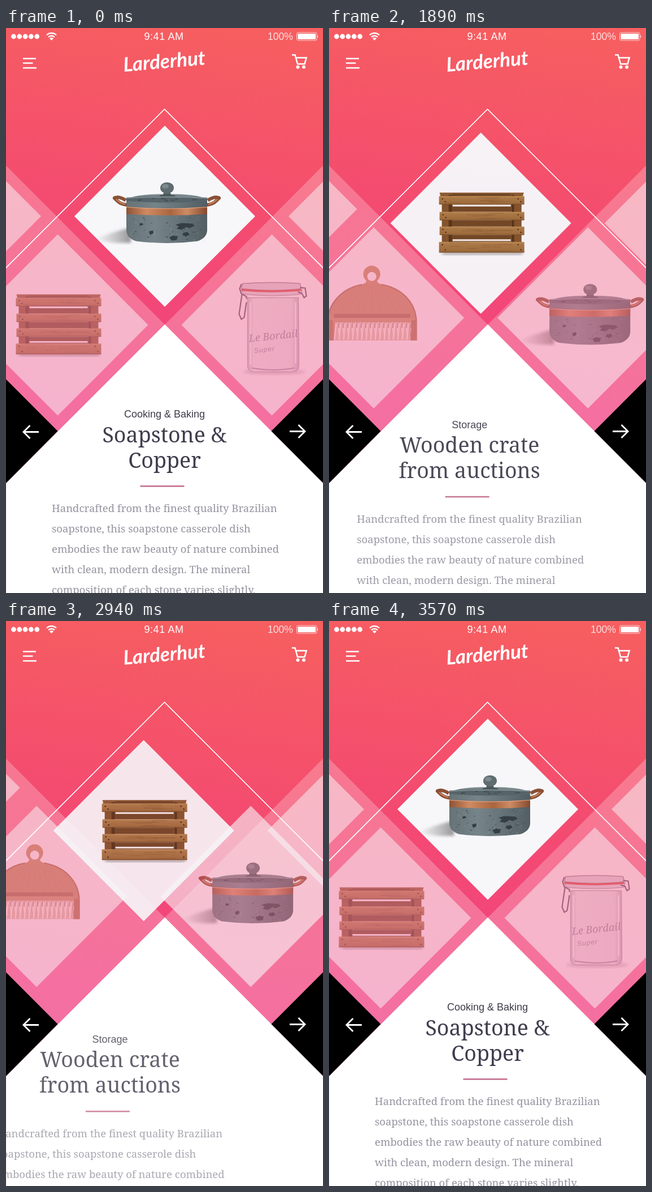
These frames come from a looping animation (561x998 px, 4970 ms). An HTML page:

```html
<!DOCTYPE html>
<html lang="en">
<head>
<meta charset="utf-8">
<title>Shop carousel</title>
<style>
  html, body { margin: 0; width: 100%; height: 100%; overflow: hidden; background: #fff; }
  svg { display: block; width: 100%; height: 100%; }
  .sans { font-family: "Liberation Sans", Arial, sans-serif; }
  .serif { font-family: "Noto Serif", serif; }
  .category { font-size: 18px; fill: #3d3b48; text-anchor: middle; }
  .title { font-size: 37.6px; fill: #3f3d4d; text-anchor: middle; }
  .copy { font-size: 18.55px; font-weight: 300; fill: #96939f; }
  .line { fill: none; stroke: #fff; stroke-width: 2.6; }
  .brand { font: italic 700 35px Lato, sans-serif; fill: #fff; text-anchor: middle; }
</style>
</head>
<body>
<svg viewBox="0 0 561 998">
  <defs>
    <linearGradient id="sky" gradientUnits="userSpaceOnUse" x1="330" y1="0" x2="230" y2="713">
      <stop stop-color="#f65e60"/><stop offset=".46" stop-color="#f44b70"/><stop offset="1" stop-color="#f04184"/>
    </linearGradient>
    <linearGradient id="stone">
      <stop stop-color="#657276"/><stop offset=".35" stop-color="#76848a"/><stop offset="1" stop-color="#525e62"/>
    </linearGradient>
    <linearGradient id="copper">
      <stop stop-color="#8e5234"/><stop offset=".25" stop-color="#d08a62"/><stop offset=".55" stop-color="#a9653f"/>
      <stop offset=".75" stop-color="#cf8b64"/><stop offset="1" stop-color="#84492e"/>
    </linearGradient>
    <linearGradient id="wood" x2="0" y2="1">
      <stop stop-color="#bb8d56"/><stop offset=".2" stop-color="#a87945"/><stop offset=".85" stop-color="#9c6d3b"/>
      <stop offset="1" stop-color="#70481f"/>
    </linearGradient>
    <linearGradient id="glass">
      <stop stop-color="#c4bfca"/><stop offset=".12" stop-color="#e9e7ec"/><stop offset=".85" stop-color="#e4e1e8"/>
      <stop offset="1" stop-color="#bdb8c4"/>
    </linearGradient>
    <linearGradient id="shade">
      <stop stop-color="#777" stop-opacity="0"/><stop offset="1" stop-color="#555" stop-opacity=".6"/>
    </linearGradient>
    <filter id="soft"><feGaussianBlur stdDeviation="2.5"/></filter>
  </defs>

  <rect width="561" height="998" fill="url(#sky)"/>
  <path fill="#fff" fill-opacity=".24" d="M0 243 281 524 561 243V804H0Z"/>
  <path fill="#fff" d="M281 523.500 561 803.500V998H0V804Z"/>
  <path d="M0 620.500 91.500 712 0 804ZM561 620.500 469.500 712 561 803.500Z"/>
  <path fill="#fbe3ea" d="M0 804h1v194h-1z"/>

  <g id="cards"></g>
  <path class="line" style="stroke-width:1.6" d="M-2 425.500 280.500 143.500 563 425.500"/>
  <g id="texts"></g>

  <path class="line" style="stroke-width:2.8" d="M58 713.500H31M42.500 702 31 713.500l11.500 11.500M502 712.500h27M517.500 701l11.500 11.500-11.500 11.500"/>

  <g id="dots" fill="#fff"></g>
  <g class="line" style="stroke-width:2.4">
    <path d="M72 12.500a12 12 0 0 1 17 0M75 16a8 8 0 0 1 11 0"/>
    <path fill="#fff" stroke="none" d="M77 18.500a5 5 0 0 1 7 0l-3.500 3.500z"/>
  </g>
  <text class="sans" x="279.500" y="21" font-size="18" letter-spacing=".6" fill="#fff" text-anchor="middle">9:41 AM</text>
  <text class="sans" x="463" y="21" font-size="17.600" fill="#fff" fill-opacity=".8">100%</text>
  <rect class="line" style="stroke-width:1" stroke-opacity=".75" x="514.500" y="8" width="35.500" height="14" rx="2.500"/>
  <rect x="516.500" y="10" width="31.500" height="10" rx="1" fill="#fff"/>
  <path fill="#fff" d="M551 12.500q2 2.500 0 5z"/>
  <path class="line" d="M30 54h23M30 62h17.500M30 70.500h24"/>
  <path class="line" d="M506 47.500h5.500l4.500 16h12.500l3-11h-18"/>
  <g fill="#fff"><circle cx="516.500" cy="69" r="3"/><circle cx="527" cy="69" r="3"/></g>
  <text class="brand" transform="translate(281 71) rotate(-5)">Larderhut</text>
</svg>

<script>
const LOOP = 4970, STEP = 70, FORTH = 1610, BACK = 2940, REST = 3570;

let seed = 7;
const random = () => (seed = (seed * 16807) % 2147483647) / 2147483647;
const repeat = (n, draw) => Array.from({ length: n }, (_, i) => draw(i)).join('');

const plank = (x, y, w, h) => `
  <rect x="${x}" y="${y}" width="${w}" height="${h}" rx="1" fill="url(#wood)"/>
  ${repeat(7, () => {
    const gx = x + 12 + random() * w * .55, gy = y + 2 + random() * (h - 4);
    const length = 15 + random() * w * .22;
    return `<path d="M${gx} ${gy}q${length / 2} ${random() * 4 - 2} ${length} 0" fill="none" stroke="#6b4320" stroke-opacity=".4" stroke-width=".8"/>`;
  })}
  ${[x + 6, x + 11, x + w - 11, x + w - 6].map((cx, i) =>
    `<circle cx="${cx}" cy="${y + (i % 2 ? h - 5 : 5)}" r="1.2" fill="#3a2413"/>`).join('')}`;

const crate = () => `
  <path d="M-72 50H76l-4 6H-66z" fill="#555" opacity=".45" filter="url(#soft)"/>
  <path d="M-73-54H76L74-46H-71z" fill="#8a5d31"/><path d="M-50-52H52L54-47H-52z" fill="#6a4422"/>
  <path d="M-52-33H54V-20H-52zM-52-5H54V6H-52zM-52 21H54V33H-52z" fill="#6f4724"/>
  <path d="M-50-32.500H53v3H-50zM-50 28.500H53v3H-50z" fill="#f4f1ee"/>
  <path d="M-69-50h18V48h-18zM54-50h18V48H54z" fill="#80542b"/>
  <path d="M-57-50h6V48h-6zM54-50h5V48h-5z" fill="#553519"/>
  ${plank(-74, -48, 151, 15)}${plank(-73, -20, 150, 15)}${plank(-73, 6, 150, 15)}${plank(-74, 33, 151, 19)}`;

const pot = () => `
  <path d="M-124 41Q-95 28-60 20V47Q-95 49-124 41z" fill="url(#shade)" filter="url(#soft)"/>
  <g fill="none" stroke="#8b5035" stroke-width="6">
    <path d="M-67-20Q-78-21-84-27T-89-32Q-82-36-69-28"/><path d="M74-20Q85-21 91-27T96-32Q89-36 76-28"/>
  </g>
  <g fill="none" stroke="#cf8a63" stroke-width="1.800">
    <path d="M-70-21Q-80-23-86-30M77-21Q87-23 93-30"/>
  </g>
  <path d="M-68-28H75V24Q75 38 58 44Q4 51-51 44Q-68 38-68 24z" fill="url(#stone)"/>
  <path d="M-66-30Q-55-38-12-39H20Q62-38 74-30z" fill="#7b8a8e"/>
  <path d="M-68-33Q4-38 75-33V-27Q4-21-68-27z" fill="#56646a"/>
  <path d="M-67-32Q4-36 74-32" fill="none" stroke="#95a2a5" stroke-width="1.200"/>
  <path d="M-1-44H9L11-38Q18-38 19-35H-10Q-9-38-3-38z" fill="#4c595d"/>
  <ellipse cx="4" cy="-50" rx="12" ry="10" fill="#5f6c70"/>
  <ellipse cx="1" cy="-53" rx="6" ry="4" fill="#7c898d"/>
  <path d="M-68-17Q4-11 75-17V-4Q4 1-68-4z" fill="url(#copper)"/>
  <path d="M-68-16Q4-10 75-16" fill="none" stroke="#e2a988" stroke-width="1"/>
  <g fill="#a3afb2" opacity=".4">
    ${repeat(90, () => `<circle cx="${random() * 134 - 63}" cy="${random() * 42 + 1}" r="${random() * .7 + .3}"/>`)}
  </g>
  <g fill="#353f43">
    <path d="M19 15l10-3 20 1 4 4-9 4-6-2-8 5-9-2 4-4zM33 29l8-1 3 4-6 4-7-3zM-28 27l7-2 1 5-6 3zM-45 13l5-1 2 3-6 2zM8 37l7-3 8 2-2 6-9 1z"/>
    ${repeat(34, () => `<ellipse cx="${random() * 136 - 64}" cy="${random() * 40 + 2}" rx="${random() * 2 + .5}" ry="${random() + .4}" opacity=".5"/>`)}
    ${repeat(9, () => `<ellipse cx="${random() * 124 - 58}" cy="${random() * 5 - 32}" rx="${random() * 4 + 1}" ry="1" opacity=".6"/>`)}
  </g>`;

const brush = () => `<g transform="translate(1.500 0)">
  <path d="M-83 40V8C-83-28-55-53-22-59Q-13-62-15-66A15 15 0 1 1 5-66Q3-62 12-59C47-53 74-28 74 8V40H62L58 6H-67L-71 40z
    M-5-81a8 8 0 1 0 .1 0z" fill="#bd8a5c" fill-rule="evenodd"/>
  ${repeat(9, i => `<path d="M${i * 15 - 64} -4Q${i * 10 - 45} -36 ${i * 5 - 25} -56" fill="none" stroke="#9c6a42" stroke-opacity=".25"/>`)}
  <path d="M-83 8C-83-28-55-53-22-59M12-59C47-53 74-28 74 8V40" fill="none" stroke="#99663e" stroke-width="2"/>
  <path d="M-72-7H63V0H-72z" fill="#9c6a44"/><path d="M-76 0H68V8H-76z" fill="#c29265"/>
  <path d="M-70 8H61L64 40H-72z" fill="#d8bea6"/>
  ${repeat(17, i => `<path d="M${i * 8 - 68} 10l-3 29M${i * 8 - 65} 8l3 25" stroke="#f6ece2" stroke-width="2.400"/>
    <path d="M${i * 8 - 64} 9v9" stroke="#9b7457" stroke-width="1.200"/>`)}
  <path d="M-83 4h9l1 36h-10zM65 4h9v36H64z" fill="#a97148"/></g>`;

const jar = () => `
  <ellipse cx="4" cy="83" rx="55" ry="5" fill="#777" opacity=".35" filter="url(#soft)"/>
  <path d="M-43-48H47L48 70Q48 83 34 83H-30Q-44 83-43 70z" fill="url(#glass)" stroke="#a49fad" stroke-width="1.200"/>
  <path d="M-38-40V70M42-40V68" stroke="#fff" stroke-width="3" opacity=".7"/>
  <path d="M-36 76Q4 83 40 76" fill="none" stroke="#9a95a3" stroke-width="2"/>
  <path d="M-52-73Q0-77 50-73L52-64Q4-58-54-64z" fill="#d8d3dc" stroke="#8d8796" stroke-width="1.500"/>
  <path d="M-54-62Q4-55 54-62L51-54Q4-49-50-54z" fill="#d9d3dc" stroke="#8d8796"/>
  <path d="M-54-62Q4-57 52-62" fill="none" stroke="#d2453f" stroke-width="3.500"/>
  <g fill="none" stroke="#56515f" stroke-width="2.200">
    <path d="M-54-72l-3 8 3 9 9 5V-46M-53-53l-5 34 4 9 5-3 4-27M50-66l9 1 2 14-4 3-4-8-7-2"/>
  </g>
  <g fill="#8f8a99" transform="rotate(-6)" font-style="italic">
    <text class="serif" x="-43" y="26" font-size="18">Le Bordail</text>
    <text class="sans" x="-36" y="46" font-size="12" letter-spacing="1">Super</text>
  </g>`;

const blank = () => '';
const cards = [[-3, blank], [-2, brush], [-1, crate], [0, pot], [1, jar], [2, blank]];
const copy = [
  'Handcrafted from the finest quality Brazilian',
  'soapstone, this soapstone casserole dish',
  'embodies the raw beauty of nature combined',
  'with clean, modern design. The mineral',
  'composition of each stone varies slightly,'
];
const texts = [
  [-1, 'Storage', 'Wooden crate', 'from auctions'],
  [0, 'Cooking &amp; Baking', 'Soapstone &amp;', 'Copper']
];

const byId = id => document.getElementById(id);
byId('dots').innerHTML = repeat(5, i => `<circle cx="${13.5 + i * 10.3}" cy="15" r="4.4"/>`);
byId('cards').innerHTML = cards.map(([, draw]) =>
  `<g><path d="M0-160 160 0 0 160-160 0Z" fill="#f7f7fa"/>${draw()}</g>`).join('');
byId('texts').innerHTML = texts.map(([, category, first, second]) => `<g>
  <text class="sans category" x="280.5" y="688">${category}</text>
  <text class="serif title" x="280.5" y="731.5">${first}</text>
  <text class="serif title" x="280.5" y="776.5">${second}</text>
  <rect x="237.5" y="808" width="78" height="2.6" fill="#c66f90"/>
  ${copy.map((line, i) => `<text class="serif copy" x="81" y="${855 + i * 36}">${line}</text>`).join('')}
</g>`).join('');

// A quick start, then an exponential settle.
const settle = (start, k) => k < start.length
  ? start[k]
  : 1 - (1 - start.at(-1)) * .47 ** (k - start.length + 1);

function progress(t) {
  if (t < FORTH || t >= REST) return 0;
  if (t < BACK) return settle([.013, .38, .706], Math.floor((t - FORTH) / STEP));
  return 1 - settle([.197, .552, .785, .9], Math.floor((t - BACK) / STEP));
}

function place(el, x, y, opacity) {
  el.setAttribute('transform', `translate(${x.toFixed(2)} ${y.toFixed(2)})`);
  el.setAttribute('opacity', opacity.toFixed(3));
}

const cardEls = byId('cards').children, textEls = byId('texts').children;
const began = performance.now();

function render() {
  const p = progress((performance.now() - began) % LOOP);
  cards.forEach(([slot], i) => {
    const s = slot + p, d = Math.abs(s);
    place(cardEls[i], 281 + 189.5 * s, 332.4 + 192 * (1 - Math.abs(d - 1)), 1 - .5 * Math.min(1, d));
  });
  texts.forEach(([slot], i) => {
    const s = slot + p, d = Math.abs(s);
    place(textEls[i], 490 * s, 289 * d, 1 - d);
  });
  requestAnimationFrame(render);
}
render();
</script>
</body>
</html>
```
